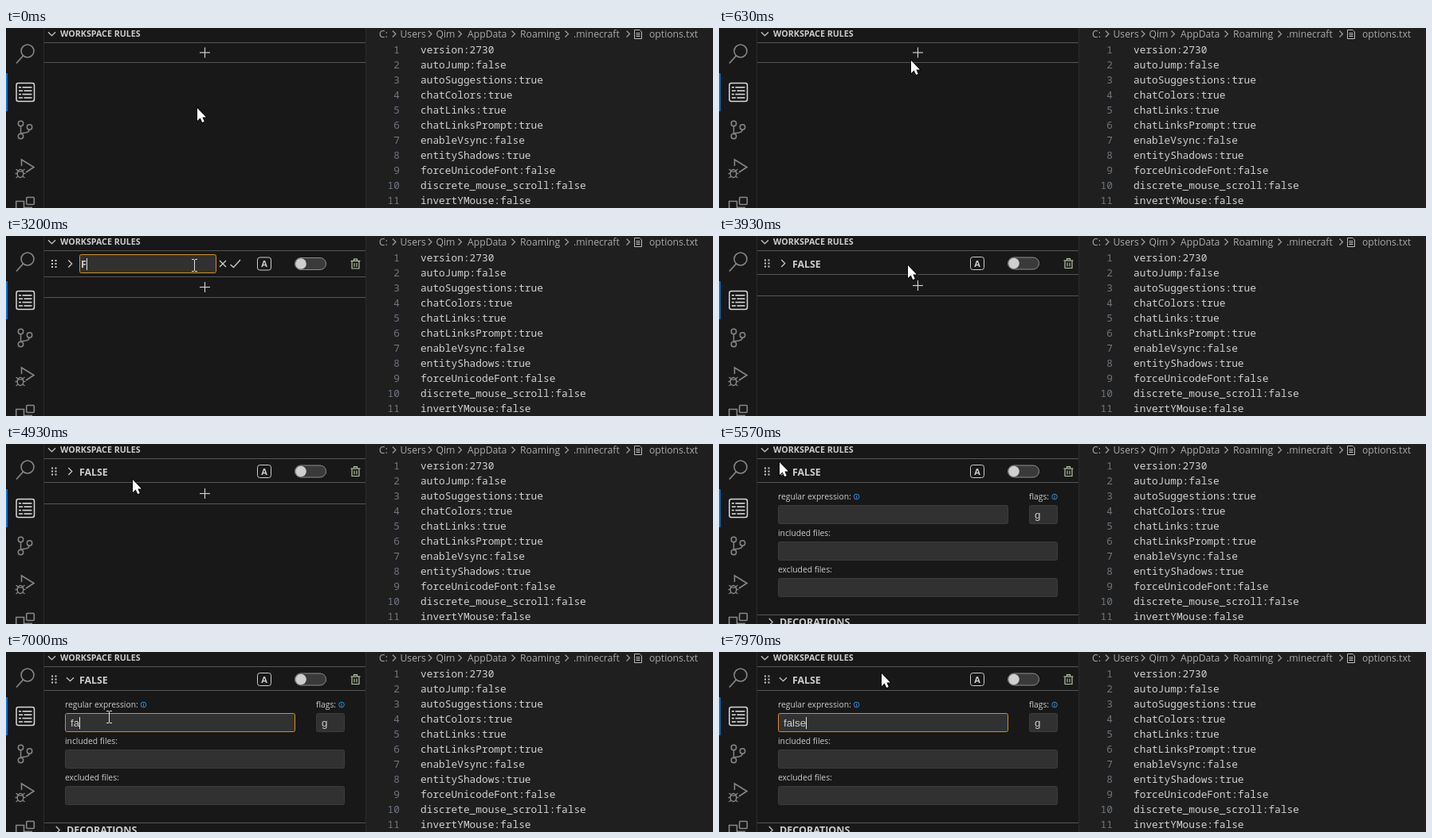
Recreate the animation shown at these times as an HTML page with a canvas. Size 887 by 227 pixels, loop 8 s.

```html
<!DOCTYPE html>
<html lang="en">
<head>
<meta charset="utf-8">
<title>Workspace rules</title>
<style>
html, body { margin: 0; width: 100%; height: 100%; overflow: hidden; background: #181818; }
canvas { display: block; }
</style>
</head>
<body>
<canvas id="stage" width="887" height="227"></canvas>
<script>
const ctx = document.getElementById('stage').getContext('2d');
const LOOP = 8000;
const UI = '"Open Sans", "Noto Sans", sans-serif';
const MONO = '"Noto Sans Mono", "DejaVu Sans Mono", monospace';
const ARIAL = '"Liberation Sans", Arial, sans-serif';
const LIGHT = '#cccccc', RULE = '#555555', FOCUS = '#d68f12', RED = '#ee1111';

const T = {
  add: 1400, caretOn: 1870, caretOff: 2470, caretBack: 3000,
  commit: 3930, expand: 5570, expanded: 5730, focus: 6300
};
const NAME_KEYS = [3200, 3330, 3430, 3570, 3730];
const REGEX_KEYS = [6830, 7000, 7270, 7330, 7570];

const LINES = [
  'version:2730', 'autoJump:false', 'autoSuggestions:true', 'chatColors:true',
  'chatLinks:true', 'chatLinksPrompt:true', 'enableVsync:false', 'entityShadows:true',
  'forceUnicodeFont:false', 'discrete_mouse_scroll:false', 'invertYMouse:false'
];
const CRUMBS = [['C:', 468], ['Users', 494.5], ['Qim', 539.5], ['AppData', 579],
  ['Roaming', 645], ['.minecraft', 712], ['options.txt', 807]];
const CRUMB_GAPS = [487, 532, 569.5, 636.5, 703.5, 780.5];

const EASE = {
  lin: p => p,
  both: p => p * p * (3 - 2 * p),
  in: p => Math.pow(p, 1.5),
  out: p => 1 - Math.pow(1 - p, 1.5)
};
// start, end, x, y to reach, easing
const MOVES = [
  [20, 770, 240, 35, 'both'],
  [950, 1030, 246, 34, 'lin'],
  [1390, 1400, 248, 36, 'lin'],
  [1770, 1870, 238, 36, 'lin'],
  [2270, 2330, 237, 37, 'lin'],
  [4600, 4930, 159, 45, 'in'],
  [4930, 5370, 76, 23, 'out'],
  [5580, 5730, 78, 28, 'lin'],
  [5840, 6030, 118, 73, 'in'],
  [6030, 6300, 130, 82, 'out'],
  [7870, 7970, 204, 27, 'lin']
];

function mouseAt(t) {
  let x = 240, y = 101;
  for (const [a, b, tx, ty, ease] of MOVES) {
    if (t < a) break;
    const p = EASE[ease](Math.min(1, (t - a) / (b - a)));
    const bow = a === 20 ? 3 * Math.sin(Math.PI * p) : 0;
    x += (tx - x) * p + bow;
    y += (ty - y) * p;
  }
  return [Math.round(x), Math.round(y)];
}

const typed = (word, keys, t) => word.slice(0, keys.filter(k => t >= k).length);

function fill(x, y, w, h, color) {
  ctx.fillStyle = color;
  ctx.fillRect(x, y, w, h);
}

function text(s, x, y, font, color = LIGHT, align = 'left') {
  ctx.font = font;
  ctx.fillStyle = color;
  ctx.textAlign = align;
  ctx.fillText(s, x, y);
}

function line(color, width, ...pts) {
  ctx.strokeStyle = color;
  ctx.lineWidth = width;
  ctx.beginPath();
  for (let i = 0; i < pts.length; i += 2) ctx.lineTo(pts[i], pts[i + 1]);
  ctx.stroke();
}

function circle(x, y, r, color, width) {
  ctx.beginPath();
  ctx.arc(x, y, r, 0, Math.PI * 2);
  if (width) {
    ctx.strokeStyle = color;
    ctx.lineWidth = width;
    ctx.stroke();
  } else {
    ctx.fillStyle = color;
    ctx.fill();
  }
}

function box(x, y, w, h, r, stroke, width = 1, inner) {
  ctx.beginPath();
  ctx.roundRect(x, y, w, h, r);
  if (inner) { ctx.fillStyle = inner; ctx.fill(); }
  ctx.strokeStyle = stroke;
  ctx.lineWidth = width;
  ctx.stroke();
}

function chevron(x, y, size, turn, color = LIGHT) {
  ctx.save();
  ctx.translate(x, y);
  ctx.rotate(turn * Math.PI / 2);
  line(color, 1.2, -size / 2, -size, size / 2, 0, -size / 2, size);
  ctx.restore();
}

const rule = y => fill(48, y, 403, 1, RULE);

function activityBar() {
  const dim = '#868686';
  fill(47, 0, 1, 227, '#2b2b2b');
  fill(0, 57, 2, 48, '#0078d4');

  circle(27, 29, 8, dim, 1.6);
  line(dim, 1.8, 21.5, 35, 13, 44.5);

  box(13, 69.5, 22.5, 23, 2.5, '#d7d7d7', 1.5);
  for (let i = 0; i < 4; i++) {
    const y = 74 + i * 4.4, cut = i % 2 ? 5 : 3;
    fill(16, y, cut, 1.6, '#d7d7d7');
    fill(17.5 + cut, y, 15 - cut, 1.6, '#d7d7d7');
  }

  circle(18.5, 120.5, 3.2, dim, 1.5);
  circle(18.5, 136.5, 3.2, dim, 1.5);
  circle(29.5, 125, 3.2, dim, 1.5);
  line(dim, 1.5, 18.5, 124, 18.5, 133);
  line(dim, 1.5, 29.5, 128.5, 28, 131, 25, 132, 21, 132.5, 18.5, 134);

  line(dim, 1.6, 19.5, 174, 19.5, 166, 35, 175.5, 25, 182);
  ctx.beginPath();
  ctx.ellipse(18, 183.5, 3.8, 5, 0, 0, Math.PI * 2);
  ctx.strokeStyle = dim;
  ctx.lineWidth = 1.5;
  ctx.stroke();
  line(dim, 1.3, 14.5, 181, 21.5, 181);
  for (const s of [-1, 1]) {
    line(dim, 1.3, 18 + s * 3, 180, 18 + s * 5.5, 178);
    line(dim, 1.3, 18 + s * 4, 183.5, 18 + s * 6.5, 183.5);
    line(dim, 1.3, 18 + s * 3, 187, 18 + s * 5.5, 189);
  }

  box(25.7, 213.5, 9.6, 9, 1, dim, 1.6);
  line(dim, 1.6, 12.7, 228, 12.7, 218.5, 22.5, 218.5, 22.5, 228);
  line(dim, 1.6, 22.5, 226.5, 33, 226.5);
}

function editor() {
  fill(451, 0, 1, 227, '#2b2b2b');
  fill(452, 0, 435, 227, '#1f1f1f');
  for (const [s, x] of CRUMBS) text(s, x, 11.5, '12.2px ' + UI, '#a9a9a9');
  for (const x of CRUMB_GAPS) chevron(x, 7.5, 4, 0, '#a0a0a0');
  line('#b8b8b8', 1, 795, 2.5, 788.5, 2.5, 788.5, 13.5, 797.5, 13.5, 797.5, 5, 795, 2.5);
  for (const y of [6.5, 8.5, 10.5]) line('#b8b8b8', 1, 790.5, y, 795.5, y);
  LINES.forEach((s, i) => {
    const y = 32 + i * 19;
    text(String(i + 1), 494, y, '12.83px ' + MONO, '#6e7681', 'right');
    text(s, 520, y, '12.83px ' + MONO, '#d0d0d0');
  });
}

function plus(y) {
  line(LIGHT, 1.2, 243, y, 256, y);
  line(LIGHT, 1.2, 249.5, y - 6.5, 249.5, y + 6.5);
}

function trash(x, y, color) {
  line(color, 1.2, x - 6, y - 3.5, x + 6, y - 3.5);
  line(color, 1.2, x - 2, y - 4, x - 2, y - 5.8, x + 2, y - 5.8, x + 2, y - 4);
  line(color, 1.2, x - 4.5, y - 3, x - 4.5, y + 6, x + 4.5, y + 6, x + 4.5, y - 3);
  for (const d of [-1.5, 1.5]) line(color, 1.1, x + d, y - 1, x + d, y + 4);
}

// Shared row parts; an invalid row has a border that insets them by a pixel.
function rowParts(y, inset, turn) {
  for (let r = 0; r < 3; r++)
    for (const c of [0, 4.5]) fill(57 + inset + c, y - 5 + r * 4, 2, 2, LIGHT);
  chevron(80.5 + inset, y, 4.5, turn);
  const ax = 315.5 - inset;
  box(ax, y - 8, 17, 16, 3, LIGHT);
  text('A', ax + 8.5, y + 4, 'bold 11px ' + UI, LIGHT, 'center');
  const tx = 362.5 - inset;
  box(tx, y - 7.5, 39, 15, 7.5, '#8c8c8c', 1, '#3a3a3a');
  circle(tx + 7.5, y, 6.8, '#cfcfcf');
  trash(438.5 - inset, y, inset ? '#b030c8' : '#b5c9a8');
}

function caret(x, y) { fill(Math.round(x), y, 1, 15, '#e4e4e4'); }

function nameEditor(t) {
  const name = typed('FALSE', NAME_KEYS, t);
  const bad = !name;
  const y = bad ? 36 : 35;
  if (bad) {
    rule(53);
    box(48.75, 19.75, 401.5, 32.5, 0, RED, 1.5);
    box(93, 24, 172, 24, 3, RED, 2, '#313131');
    plus(66.5);
    rule(79);
  } else {
    rule(18);
    rule(51);
    box(92.5, 23.5, 171, 23, 2, FOCUS, 1, '#313131');
    plus(64.5);
    rule(77);
  }
  rowParts(y, bad ? 1 : 0, 0);
  line(LIGHT, 1.2, 268, y - 4, 276, y + 4);
  line(LIGHT, 1.2, 276, y - 4, 268, y + 4);
  const cx = bad ? 289 : 288;
  line(LIGHT, 1.3, cx - 6.5, y + 1, cx - 2.5, y + 4.5, cx + 6, y - 5);

  const font = 'bold 12.35px ' + UI;
  text(name, 94, 39.5, font);
  const on = (t >= T.caretOn && t < T.caretOff) || t >= T.caretBack;
  if (on) caret(94 + ctx.measureText(name).width, bad ? 29 : 28);
}

function field(x, y, w, active) {
  box(x + 0.5, y + 0.5, w - 1, 23, 2, active ? FOCUS : '#3c3c3c', 1, '#313131');
}

function info(x, y) {
  circle(x, y, 3.3, '#2f8fd8', 1);
  fill(x - 0.5, y - 0.5, 1, 2.5, '#2f8fd8');
  fill(x - 0.5, y - 2, 1, 1, '#2f8fd8');
}

function details(t) {
  const label = '10.3px ' + UI, value = '13.333px ' + ARIAL;
  const active = t >= T.focus;
  text('regular expression:', 74, 70, label);
  info(172.5, 66.5);
  text('flags:', 389, 70, label);
  info(421, 66.5);
  field(74, 77, 289, active);
  field(389, 77, 36);
  text('g', 396, 94, value);
  text('included files:', 74, 116, label);
  field(74, 123, 351);
  text('excluded files:', 74, 162, label);
  field(74, 169, 351);
  rule(215);
  chevron(65, 224.5, 4.5, 0);
  text('DECORATIONS', 76, 229, 'bold 12.5px ' + UI);

  const word = typed('false', REGEX_KEYS, t);
  text(word, 81, 94, value);
  if (active) caret(81 + ctx.measureText(word).width, 82);
}

function ruleRow(t) {
  const turn = Math.max(0, Math.min(1, (t - T.expand) / (T.expanded - T.expand)));
  rule(18);
  rule(48);
  rowParts(34.5, 0, turn);
  text('FALSE', 92, 39.5, 'bold 12.35px ' + UI);
  if (t >= T.expand) {
    details(t);
  } else {
    plus(62.5);
    rule(75);
  }
}

function pointer(x, y) {
  ctx.beginPath();
  for (const [dx, dy] of [[0, 0], [0, 16], [3.7, 12.6], [6.2, 18], [8.8, 16.9], [6.4, 11.6], [11, 11.4]])
    ctx.lineTo(x + dx, y + dy);
  ctx.closePath();
  ctx.strokeStyle = '#000';
  ctx.lineWidth = 1.5;
  ctx.stroke();
  ctx.fillStyle = '#fff';
  ctx.fill();
}

function ibeam(x, y) {
  const c = '#dedede';
  fill(x - 0.5, y - 7, 1, 14, c);
  for (const d of [-8, 7]) {
    fill(x - 3.5, y + d, 3, 1, c);
    fill(x + 0.5, y + d, 3, 1, c);
  }
}

function mouse(t) {
  const [x, y] = mouseAt(t);
  const overName = t >= T.add && t < T.commit;
  const overRegex = t >= T.expand && x >= 74 && x < 363 && y >= 77 && y < 101;
  if (overName || overRegex) ibeam(x - 0.5, y);
  else pointer(x, y);
}

function draw() {
  const t = performance.now() % LOOP;
  fill(0, 0, 887, 227, '#181818');
  activityBar();
  chevron(57.5, 7.5, 4.5, 1);
  text('WORKSPACE RULES', 68, 11, 'bold 10.7px ' + UI);
  if (t < T.add) {
    rule(18);
    plus(31);
    rule(43);
  } else if (t < T.commit) {
    nameEditor(t);
  } else {
    ruleRow(t);
  }
  editor();
  mouse(t);
  requestAnimationFrame(draw);
}
draw();
</script>
</body>
</html>
```
